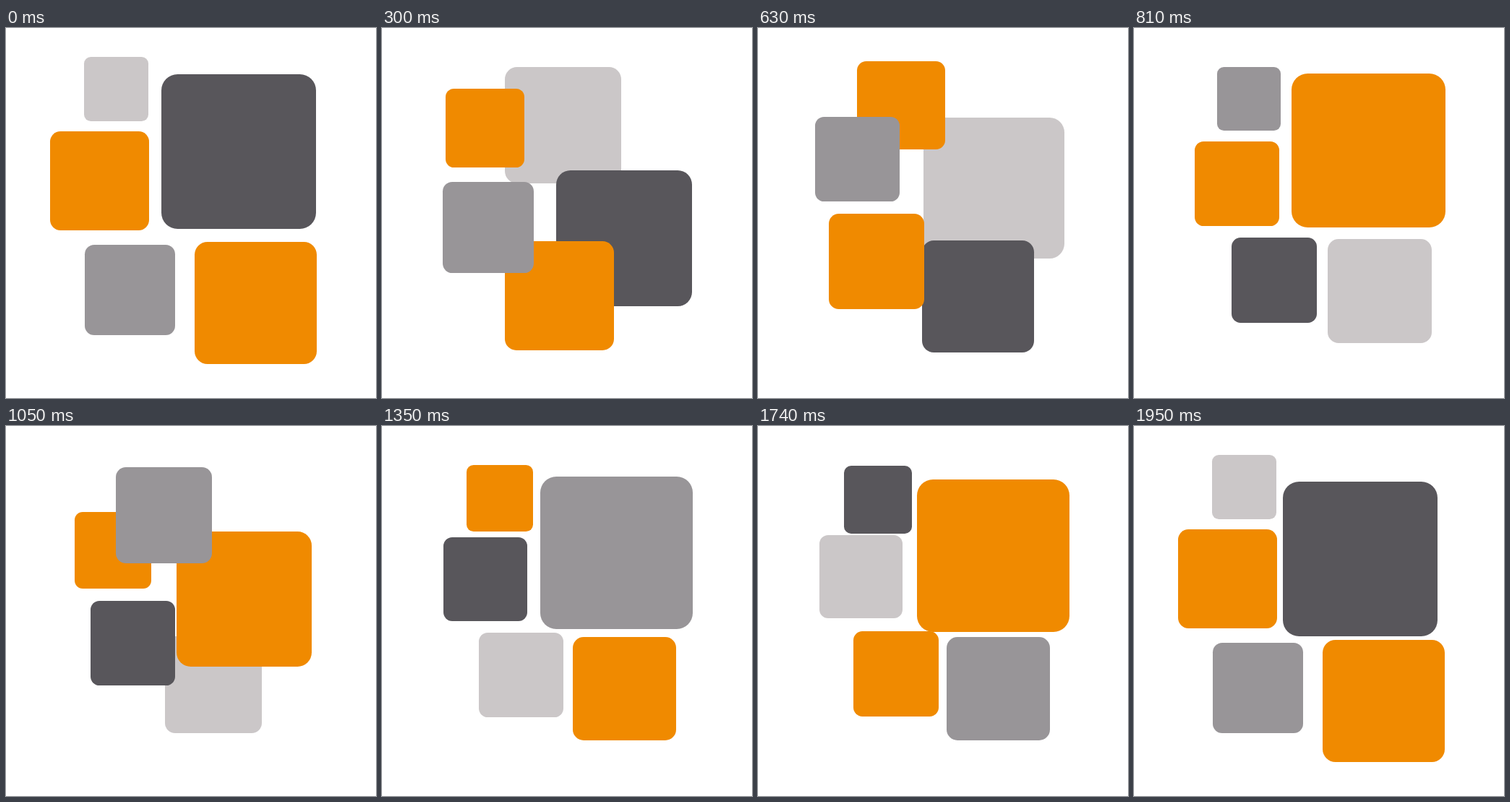
These frames come from a looping animation (512 by 512 pixels, 1.98 s). An HTML page with a canvas:

```html
<!DOCTYPE html>
<html lang="en">
<head>
<meta charset="utf-8">
<title>Rotating squares</title>
<style>
html, body { margin: 0; width: 100%; height: 100%; overflow: hidden; background: #fff; }
canvas { display: block; width: 512px; height: 512px; }
</style>
</head>
<body>
<canvas id="stage" width="512" height="512"></canvas>
<script>
const ctx = document.getElementById("stage").getContext("2d");
const LOOP = 1980;
const TICK = 30;

// Five slots, clockwise from the top left: [centre x, centre y, side].
const open = [[152.5, 84.5, 89], [322, 170.5, 214], [345, 380.5, 169], [171.5, 362.5, 125], [129, 211.5, 137]];
const wide = [...open.slice(0, 3), [171.5, 362.5, 138], [129, 211.5, 127]];
const tight = [[158.5, 97.5, 88], [324.3, 169.3, 212.5], [340, 363.6, 143.5], [194, 349, 117.5], [142, 214.8, 116.5]];

// The layout reached after each move; every move shifts all squares one slot on.
const layouts = [open, wide, tight, tight, tight, open];
const moves = [[159, 404], [565, 810], [961, 1206], [1343, 1588], [1730, 1949]];

// Back to front, with the slot each starts in. The dark one lands
// off its slot on the last move and snaps home as the loop restarts.
const squares = [
  { color: "#cbc7c8", slot: 0 },
  { color: "#58565b", slot: 1, miss: [-9, 13, 0] },
  { color: "#f08a00", slot: 4 },
  { color: "#f08a00", slot: 2 },
  { color: "#989598", slot: 3 }
];

// Number of moves completed, with the running move as a fraction.
function progress(t) {
  return moves.reduce((sum, [a, b]) => sum + Math.min(1, Math.max(0, (t - a) / (b - a))), 0);
}

function stop({ slot, miss }, n) {
  const place = layouts[n][(slot + n) % 5];
  return miss && n === moves.length ? place.map((v, k) => v + miss[k]) : place;
}

function poseAt(square, p) {
  const n = Math.min(Math.floor(p), moves.length - 1);
  const to = stop(square, n + 1);
  return stop(square, n).map((v, k) => v + (to[k] - v) * (p - n));
}

function drawSquare(color, [x, y, side]) {
  const size = Math.round(side);
  ctx.fillStyle = color;
  ctx.beginPath();
  ctx.roundRect(Math.round(x - side / 2), Math.round(y - side / 2), size, size, size * 0.105);
  ctx.fill();
}

function draw(t) {
  const p = progress(t);
  ctx.fillStyle = "#fff";
  ctx.fillRect(0, 0, 512, 512);
  for (const square of squares) drawSquare(square.color, poseAt(square, p));
}

const start = performance.now();
function frame() {
  const t = (performance.now() - start) % LOOP;
  draw(Math.floor(t / TICK) * TICK);
  requestAnimationFrame(frame);
}
frame();
</script>
</body>
</html>
```
